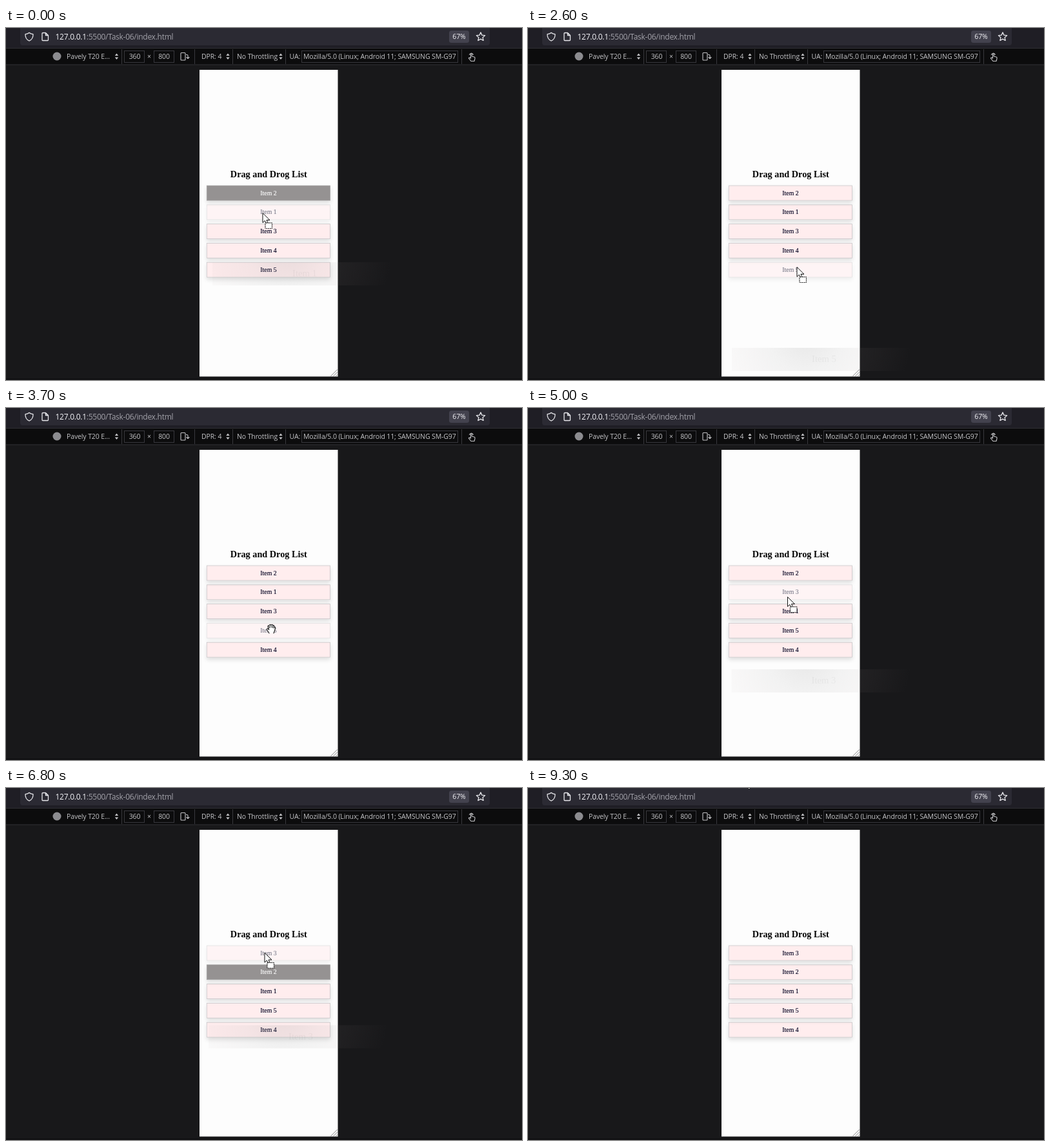
Animation, 800 px wide and 547 px high, one loop 9400 ms. Source, as an HTML page:

```html
<!DOCTYPE html>
<html lang="en">
<head>
<meta charset="utf-8">
<title>Drag list</title>
<style>
html, body { margin: 0; width: 100%; height: 100%; overflow: hidden; background: #18181a; }
svg { display: block; width: 100vw; height: 100vh; }
.ui { font: 10.5px "Open Sans", "Noto Sans", sans-serif; letter-spacing: -.12px; fill: #c4c4c7; }
.url { font-size: 12px; letter-spacing: -.27px; fill: #a3a2aa; }
.page { font-family: "Liberation Serif", "Times New Roman", serif; text-anchor: middle; }
.icon { fill: none; stroke: #e8e8ec; stroke-width: 1.3; stroke-linejoin: round; stroke-linecap: round; }
.small { stroke: #c4c4c7; stroke-width: 1.1; }
</style>
</head>
<body>
<svg viewBox="0 0 800 547" preserveAspectRatio="none">
  <defs>
    <filter id="shadow" x="-10%" y="-40%" width="120%" height="210%">
      <feDropShadow dx="0" dy="3.5" stdDeviation="3.3" flood-color="#000" flood-opacity=".12"/>
    </filter>
    <radialGradient id="fade" gradientUnits="userSpaceOnUse" cx="115" cy="-20" r="165">
      <stop offset="0" stop-color="#909090" stop-opacity=".2"/>
      <stop offset=".35" stop-color="#909090" stop-opacity=".1"/>
      <stop offset=".7" stop-color="#a08f90" stop-opacity=".05"/>
      <stop offset="1" stop-color="#a08f90" stop-opacity="0"/>
    </radialGradient>
  </defs>

  <rect width="800" height="547" fill="#18181a"/>
  <rect width="800" height="31" fill="#1f1e25"/>
  <path d="M22 0H750V23Q750 27 746 27H26Q22 27 22 23Z" fill="#2b2a33"/>
  <rect y="31" width="800" height="26" fill="#0c0c0d"/>
  <path d="M0 31.5H800M0 57H800" stroke="#303034"/>
  <path d="M0 545.5H800" stroke="#0b0b0c"/>

  <g class="icon">
    <path d="M36 7.3C34 9 32 9.4 30 9.6C29.8 14.5 31.5 18 36 20C40.5 18 42.2 14.5 42 9.6C40 9.4 38 9 36 7.3Z"/>
    <path d="M56 8.5Q56 7.5 57 7.5H61.5L65.5 11.5V18.5Q65.5 19.5 64.5 19.5H57Q56 19.5 56 18.5ZM61.5 7.5V11.5H65.5"/>
    <path id="star"/>
  </g>
  <text class="ui url" x="76.5" y="18.2"><tspan fill="#f4f4f8">127.0.0.1</tspan>:5500/Task-06/index.html</text>
  <rect x="687" y="4" width="31" height="19" rx="3.5" fill="#43424e"/>
  <text class="ui" x="702.5" y="17.4" text-anchor="middle" style="fill:#f4f4f8">67%</text>

  <g stroke="#38383d" fill="none">
    <path d="M179.5 33V56M292.5 33V56M351.5 33V56M433.5 33V56M706.5 33V56"/>
    <rect x="183.5" y="35.5" width="31" height="18"/>
    <rect x="229.5" y="35.5" width="31" height="18"/>
    <rect x="458.5" y="35.5" width="242" height="18"/>
  </g>
  <circle cx="79" cy="44" r="6.5" fill="#8c8c90"/>
  <g class="ui">
    <text x="94" y="48">Pavely T20 E...</text>
    <text x="199.5" y="48" text-anchor="middle">360</text>
    <text x="222" y="48" text-anchor="middle">×</text>
    <text x="245" y="48" text-anchor="middle">800</text>
    <text x="303" y="48">DPR: 4</text>
    <text x="358" y="48">No Throttling</text>
    <text x="439.5" y="48">UA:</text>
    <text x="461" y="48">Mozilla/5.0 (Linux; Android 11; SAMSUNG SM-G97</text>
  </g>
  <g id="arrows" fill="#c4c4c7"></g>
  <g class="icon small">
    <rect x="271" y="38.5" width="7" height="11.5" rx="1"/>
    <path d="M279.5 41.5H280.5Q282 41.5 282 43V47M280 45.5L282 47.500L284 45.5"/>
    <path d="M720.5 46.5V40Q721.3 38.8 722.2 40V44L726 45Q727.500 45.500 727 47.500L726 51.5H721L717.300 47Q718.300 45.300 720.500 47M718.500 41.500A3 3 0 0 1 724.300 41.500"/>
  </g>

  <rect x="300" y="65" width="214.5" height="476.6" fill="#fdfdfd"/>
  <path d="M503 541.5L514 530.5M507 541.5L514 534.5M511 541.5L514 538.5" stroke="#77777a" stroke-width=".9"/>
  <text class="page" x="407.3" y="231.8" font-size="14.25" font-weight="bold" fill="#050505">Drag and Drog List</text>
  <g id="list" class="page" font-size="9.8"></g>
  <g id="ghost" class="page">
    <rect width="288" height="36" fill="url(#fade)"/>
    <text x="143" y="22" font-size="14.7" fill="#707070" opacity=".08"></text>
  </g>

  <g id="cursor" stroke="#111" stroke-linejoin="round" stroke-linecap="round">
    <path id="arrow" d="M0 0V14.5L3.4 11.4L6 16.8L8.4 15.7L6 10.5H10.6Z" fill="#fff"/>
    <rect id="box" x="4" y="14.8" width="10.5" height="8.7" rx="1" fill="#fff" stroke-width="1.2" stroke-linecap="butt" stroke-dasharray="1.7 1"/>
    <g id="hand">
      <path d="M-3 7L-6.5 1.5Q-7 -.5 -5 -.3L-3 2L-5 -4L-2.500 -5.500L-.5 -6.500L2.500 -6L4.500 -4.500L6.500 -2.500L5.500 3L4 7Z" fill="#fff" stroke="none"/>
      <path d="M-3 7L-6.500 1.500Q-7 -.5 -5 -.3L-3.300 1.500L-5 -3.500Q-5 -5.500 -3.300 -4.800L-2.200 -1.500M-2.600 -5.500Q-1.300 -7.300 -.3 -5.800L.2 -2M.4 -6Q2 -7.300 2.700 -5.500L2.600 -1.600M3.200 -5Q4.700 -5.500 4.900 -3.800L4.600 -1M5.200 -3Q6.900 -3 6.600 -1L5.500 3L4 7" fill="none" stroke-width="1.1"/>
    </g>
  </g>
</svg>
<script>
const LOOP = 9400, STEP = 100, FADE = 200;
const $ = id => document.getElementById(id);

// time, x, y of the pointer
const path = [
  [0, 398, 288], [600, 399, 289], [1000, 400, 300], [1500, 404, 322],
  [2300, 417, 372], [2600, 417, 372], [3050, 412, 345], [3700, 411, 343],
  [4300, 406, 318], [4700, 405, 316], [5100, 402, 290], [6200, 401, 284],
  [6600, 401, 258], [6900, 401, 256], [7400, 406, 200], [7700, 406, 188],
  [8200, 406, 188], [8900, 336, -15]
];
// time from which the items stand in this order
const orders = [[0, "21345"], [2900, "21354"], [5000, "23154"], [6500, "32154"]];
const drags = [
  { item: 1, from: -1, drop: 600, to: 700, dx: -78, dy: 76 },
  { item: 5, from: 2450, drop: 3400, to: 3800, dx: -101, dy: 125 },
  { item: 3, from: 4700, drop: 6900, to: 7000, dx: -87, dy: 112 }
];
const overs = [
  { item: 2, from: -500, to: 600 }, { item: 4, from: 2900, to: 3350 },
  { item: 1, from: 5000, to: 6150 }, { item: 2, from: 6500, to: 6900 }
];

const clamp = v => Math.max(0, Math.min(1, v));
const mix = (a, b, k) => `rgb(${a.map((v, i) => Math.round(v + (b[i] - v) * k))})`;
const show = (el, on) => el.setAttribute("display", on ? "inline" : "none");
const move = (el, x, y) => el.setAttribute("transform", `translate(${x} ${y})`);

function make(parent, tag, attrs) {
  const el = document.createElementNS("http://www.w3.org/2000/svg", tag);
  for (const k in attrs) el.setAttribute(k, attrs[k]);
  return parent.appendChild(el);
}

const starPts = Array.from({ length: 10 }, (_, i) => {
  const a = i * Math.PI / 5 - Math.PI / 2, r = i % 2 ? 3.3 : 7;
  return (736 + r * Math.cos(a)).toFixed(2) + " " + (13.8 + r * Math.sin(a)).toFixed(2);
});
$("star").setAttribute("d", "M" + starPts.join("L") + "Z");

for (const x of [171.5, 344, 426])
  make($("arrows"), "path", { d: `M${x - 2.7} 43L${x} 39.5L${x + 2.7} 43ZM${x - 2.7} 45.5L${x} 49L${x + 2.7} 45.5Z` });

const items = [1, 2, 3, 4, 5].map(n => {
  const g = make($("list"), "g", {});
  const rect = make(g, "rect", { x: 311.3, y: 0, width: 191.2, height: 23, "stroke-width": .8, filter: "url(#shadow)" });
  const text = make(g, "text", { x: 407, y: 14.7, "stroke-width": .15 });
  text.textContent = "Item " + n;
  return { n, g, rect, text };
});

function pointer(t) {
  const i = path.findIndex(p => p[0] > t);
  if (i < 0) return path[path.length - 1].slice(1);
  const a = path[i - 1], b = path[i], u = (t - a[0]) / (b[0] - a[0]);
  const k = u * u * (3 - 2 * u);
  return [a[1] + (b[1] - a[1]) * k, a[2] + (b[2] - a[2]) * k];
}

function shade(n, t) {
  return Math.max(0, ...overs.filter(o => o.item === n).map(o =>
    Math.min(clamp((t - o.from) / FADE), 1 - clamp((t - o.to) / FADE))));
}

function draw(t) {
  const [x, y] = pointer(t);
  const order = orders.filter(o => o[0] <= t).pop()[1];
  const drag = drags.find(d => t >= d.from && t < d.to);
  const held = drag && t < drag.drop;

  for (const { n, g, rect, text } of items) {
    const k = shade(n, t), ink = mix([0, 0, 32], [255, 255, 255], k);
    move(g, 0, 245 + order.indexOf(n) * 29.8);
    g.setAttribute("opacity", drag && drag.item === n ? .5 : 1);
    rect.setAttribute("fill", mix([255, 237, 238], [149, 146, 146], k));
    rect.setAttribute("stroke", mix([200, 198, 200], [165, 163, 163], k));
    text.setAttribute("fill", ink);
    text.setAttribute("stroke", ink);
  }

  show($("ghost"), held);
  if (held) {
    move($("ghost"), x + drag.dx, y + drag.dy);
    $("ghost").querySelector("text").textContent = "Item " + drag.item;
  }

  const hand = !held && y > 244 && y < 390;
  move($("cursor"), x, y);
  show($("hand"), hand);
  show($("arrow"), !hand);
  show($("box"), held);
}

function tick(now) {
  draw(Math.floor(now % LOOP / STEP) * STEP);
  requestAnimationFrame(tick);
}
draw(0);
requestAnimationFrame(tick);
</script>
</body>
</html>
```
